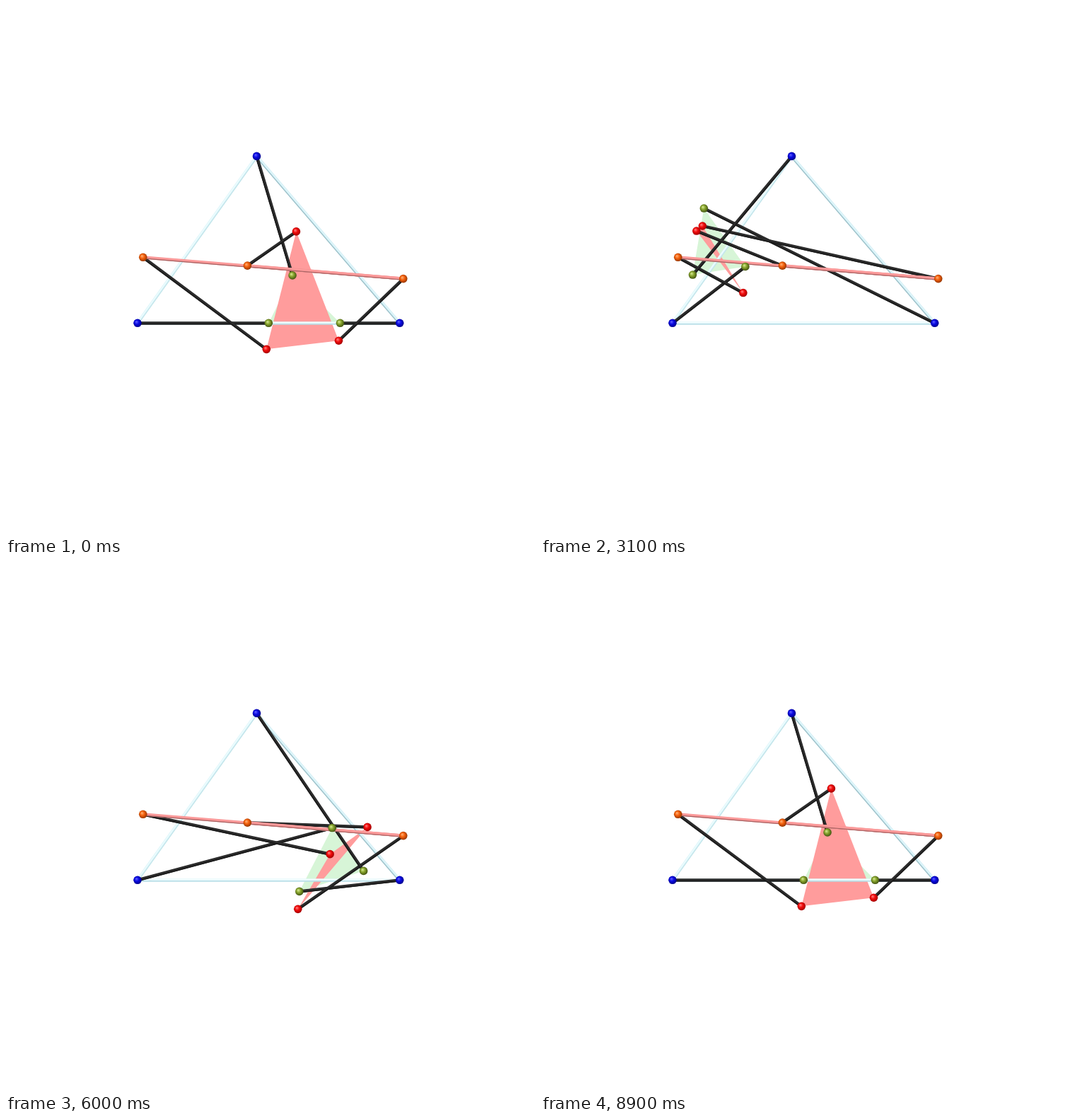
Recreate the animation shown at these times as an HTML page with a canvas. Size 748x748 px, loop 9 s.

```html
<!DOCTYPE html>
<html lang="en">
<head>
<meta charset="utf-8">
<title>Planar linkage</title>
<style>
html, body { margin: 0; width: 100%; height: 100%; overflow: hidden; background: #fff; }
canvas { display: block; }
</style>
</head>
<body>
<canvas id="stage" width="748" height="748"></canvas>
<script>
const ctx = document.getElementById('stage').getContext('2d');
const STEPS = 90, STEP_MS = 100, UNIT = 33.7;

// Mechanism coordinates, origin at the lower left anchor, y upwards
const base = [[0, 0], [11, 0], [5, 7]];
const bar = [[0.23, 2.76], [11.15, 1.86], [4.61, 2.41]];
const platform = [[0, 0], [3, 0], [1, 2]];
const shift = [[-0.09, -1.1], [-0.06, -0.74], [0.16, 1.84]];

const toScreen = ([x, y]) => [186 + x * UNIT, 448.3 - y * UNIT];

function line(a, b, width, color, offset = 0) {
  let nx = a[1] - b[1], ny = b[0] - a[0];
  const k = offset / Math.hypot(nx, ny) * (ny < 0 ? -1 : 1);
  nx *= k;
  ny *= k;
  ctx.lineWidth = width;
  ctx.strokeStyle = color;
  ctx.beginPath();
  ctx.moveTo(a[0] + nx, a[1] + ny);
  ctx.lineTo(b[0] + nx, b[1] + ny);
  ctx.stroke();
}

// Cylinder: body, lit upper side, shaded lower side
function rod(a, b, body, light, shade) {
  line(a, b, 4.2, body);
  line(a, b, 1.4, light, -0.7);
  line(a, b, 1.1, shade, 1.6);
}

function triangle(points, color) {
  ctx.fillStyle = color;
  ctx.beginPath();
  points.forEach(p => ctx.lineTo(...p));
  ctx.fill();
}

function ball([x, y], light, body, dark) {
  const g = ctx.createRadialGradient(x - 1.6, y - 1.8, 0.3, x - 0.4, y - 0.4, 6.4);
  g.addColorStop(0, light);
  g.addColorStop(0.45, body);
  g.addColorStop(1, dark);
  ctx.fillStyle = g;
  ctx.beginPath();
  ctx.arc(x, y, 5.8, 0, 2 * Math.PI);
  ctx.fill();
}

function draw(step) {
  const angle = 2 * Math.PI * step / (STEPS - 1);
  const c = Math.cos(angle), s = Math.sin(angle);
  const moved = platform.map(([x, y]) => [
    5.5 - 3 * s + x * c - y * s,
    1.5 * (1 - c) + x * s + y * c
  ]);
  const green = moved.map(toScreen);
  const red = moved.map(([x, y], i) => toScreen([x + shift[i][0], y + shift[i][1]]));
  const blue = base.map(toScreen), orange = bar.map(toScreen);

  ctx.clearRect(0, 0, 748, 748);
  triangle(green, '#d7f5d7');
  triangle(red, '#ff9c9c');
  rod(blue[0], blue[2], '#d9f4f8', '#effdff', '#c0e2e8');
  rod(blue[1], blue[2], '#cdebf2', '#e2f8fc', '#98bcc4');
  rod(blue[0], blue[1], '#e6f8fb', '#f1fdff', '#a9d6e0');
  for (let i = 0; i < 3; i++) {
    rod(blue[i], green[i], '#222', '#303030', '#181818');
    rod(orange[i], red[i], '#222', '#303030', '#181818');
  }
  rod(orange[0], orange[1], '#f59292', '#ff9f9f', '#a66464');
  rod(orange[1], orange[2], '#f59292', '#ff9f9f', '#a66464');

  blue.forEach(p => ball(p, '#5a5aff', '#0808e0', '#000088'));
  green.forEach(p => ball(p, '#d2e68c', '#86a32c', '#3f5010'));
  orange.forEach(p => ball(p, '#ffad70', '#f4600c', '#923400'));
  red.forEach(p => ball(p, '#ff7a7a', '#f00a0a', '#a00000'));
}

function tick(now) {
  draw(Math.floor(now / STEP_MS) % STEPS);
  requestAnimationFrame(tick);
}
tick(0);
</script>
</body>
</html>
```
